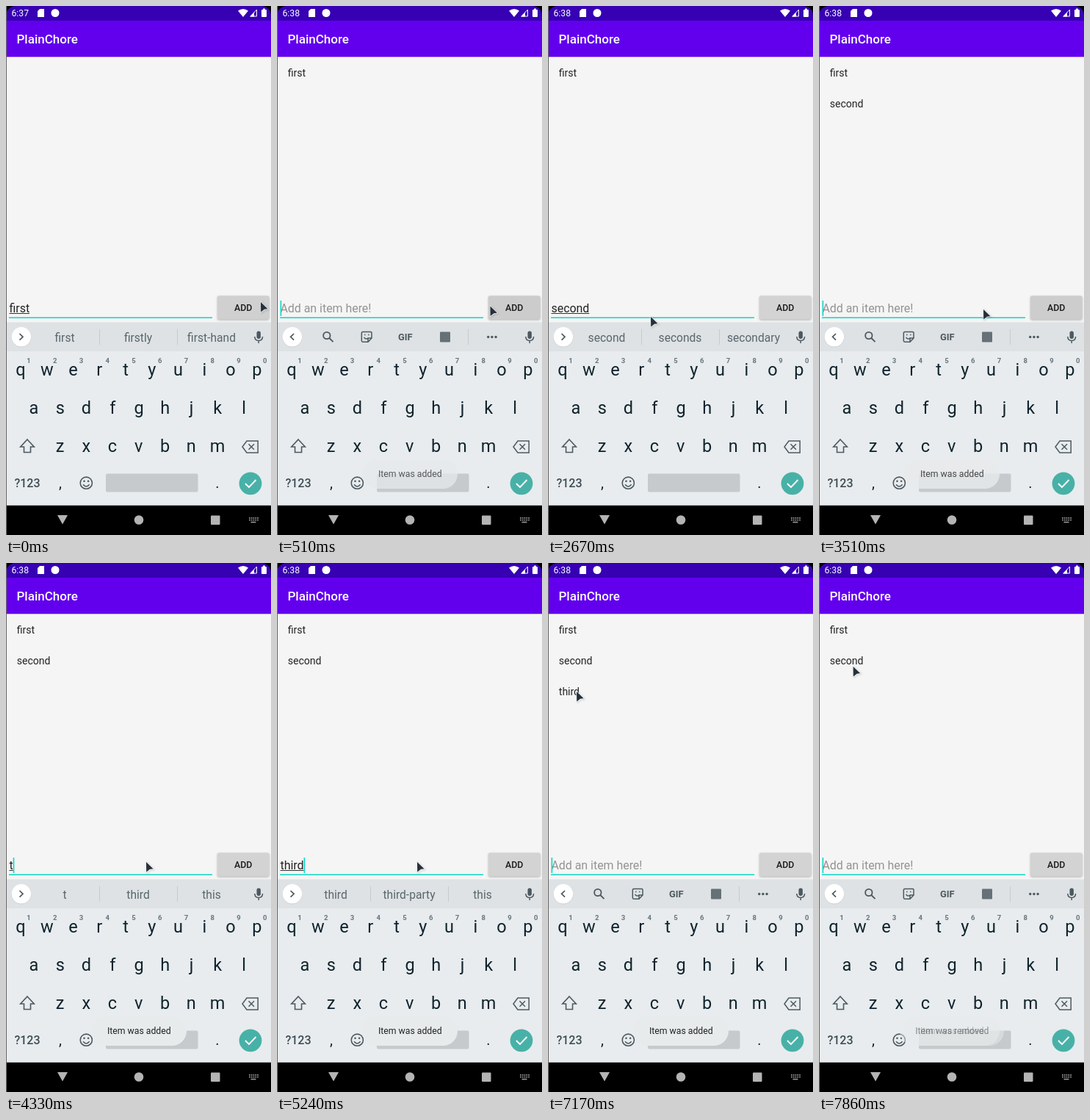
An HTML page with a canvas that plays this animation: 361x720 px, repeating every 8 s.

```html
<!DOCTYPE html>
<html lang="en">
<head>
<meta charset="utf-8">
<title>To-do list demo</title>
<style>
html, body { margin: 0; width: 100%; height: 100%; overflow: hidden; background: #f5f5f5; }
canvas { display: block; width: 361px; height: 720px; }
</style>
</head>
<body>
<canvas id="stage" width="361" height="720"></canvas>
<script>
const ctx = document.getElementById('stage').getContext('2d');
const LOOP = 8000, FRAME = 130, BLINK = 500;
const TOAST_DELAY = 100, TOAST_LIFE = 1900, TOAST_FADE = 210;
const INK = '#10232d', ICON = '#4c5960', KEYS = '#e8ecee', STRIP = '#dee2e4', TEAL = '#0dd6c4';

// Each to-do is typed between start and done, then added (and maybe removed).
const todos = [
  { word: 'first', hints: ['firstly', 'first-hand'], start: -1200, done: -600, added: 260 },
  { word: 'second', hints: ['seconds', 'secondary'], start: 1730, done: 2140, added: 3240 },
  { word: 'third', hints: ['third-party', 'this'], start: 4330, done: 4810, added: 5760, removed: 7590 }
];

const pointerStart = { x: 347, y: 403 };
const pointerMoves = [
  { from: 300, to: 910, x: 140, y: 423 },
  { from: 2700, to: 3090, x: 345, y: 404 },
  { from: 3260, to: 3510, x: 224, y: 413 },
  { from: 3510, to: 3760, x: 191, y: 407 },
  { from: 5240, to: 5630, x: 345, y: 405 },
  { from: 5800, to: 6170, x: 16, y: 160 },
  { from: 6240, to: 6600, x: 39, y: 175 },
  { from: 7600, to: 7860, x: 47, y: 139 }
];

const clamp = v => Math.max(0, Math.min(1, v));
const easeOut = p => 1 - (1 - p) ** 2;

function inputState(t) {
  const todo = todos.findLast(item => item.start <= t);
  if (t >= todo.added) return { typed: '', words: [], lastEdit: todo.added };
  const { word, hints, start, done } = todo;
  const progress = clamp((t - start) / (done - start));
  const typed = word.slice(0, 1 + Math.floor((word.length - 1) * progress));
  const words = typed === word ? [word, ...hints] : [typed, word, hints[1]];
  return { typed, words, lastEdit: Math.min(t, done) };
}

function pointerAt(t) {
  let { x, y } = pointerStart;
  for (const move of pointerMoves) {
    const p = easeOut(clamp((t - move.from) / (move.to - move.from)));
    x += (move.x - x) * p;
    y += (move.y - y) * p;
  }
  return { x, y };
}

function rect(x, y, w, h, fill, r = 0) {
  ctx.fillStyle = fill;
  ctx.beginPath();
  ctx.roundRect(x, y, w, h, r);
  ctx.fill();
}
function disc(x, y, r, fill) {
  ctx.fillStyle = fill;
  ctx.beginPath();
  ctx.arc(x, y, r, 0, Math.PI * 2);
  ctx.fill();
}
function ring(x, y, r, width) {
  ctx.strokeStyle = ICON;
  ctx.lineWidth = width;
  ctx.beginPath();
  ctx.arc(x, y, r, 0, Math.PI * 2);
  ctx.stroke();
}
function fillPath(d, fill) {
  ctx.fillStyle = fill;
  ctx.fill(new Path2D(d));
}
function strokePath(d, color = ICON, width = 1.6) {
  ctx.strokeStyle = color;
  ctx.lineWidth = width;
  ctx.stroke(new Path2D(d));
}
function label(str, x, y, size, fill, align = 'left', weight = 400) {
  ctx.font = `${weight} ${size}px Roboto, sans-serif`;
  ctx.textAlign = align;
  ctx.fillStyle = fill;
  ctx.fillText(str, x, y);
  return ctx.measureText(str).width;
}

function drawBars(t) {
  rect(0, 0, 361, 720, '#f5f5f5');
  rect(0, 0, 361, 20, '#000');
  rect(0, 0, 361, 20, '#3700b3', [13, 13, 0, 0]);
  rect(0, 20, 361, 49, '#6200ee');
  rect(0, 69, 361, 1, '#cbb5ea');
  label(t < 390 ? '6:37' : '6:38', 7.5, 14, 12.2, '#fff');
  fillPath('M46 4H52V15H43V7Z', '#fff');
  disc(67, 9.5, 5.5, '#fff');
  fillPath('M316 6.5Q323 1.5 330 6.5L323 15Z', '#fff');
  strokePath('M333 14L341.5 5V14Z', '#fff', 1);
  fillPath('M332 14.5L338 8.5V14.5Z', '#fff');
  rect(348, 5, 7, 10, '#fff', 1);
  rect(350, 3.5, 3, 2, '#fff');
  label('PlainChore', 14.5, 51, 17, '#fff', 'left', 500);

  rect(0, 679.5, 361, 41, '#000');
  fillPath('M70 693H84L77 705.5Z', '#b4b4b4');
  disc(181, 699.5, 6.3, '#b4b4b4');
  rect(279, 693.5, 12.5, 12.5, '#b4b4b4', 1);
  for (let row = 0; row < 2; row++)
    for (let col = 0; col < 5; col++) rect(331 + col * 2.8, 696 + row * 2.8, 1.7, 1.7, '#999');
  rect(333.5, 701.8, 7, 1.6, '#999');
}

function drawList(t) {
  todos.filter(todo => todo.added <= t && !(todo.removed <= t))
    .forEach((todo, i) => label(todo.word, 14.8, 95.8 + i * 42, 14, '#222'));
}

function drawInput(t, { typed, lastEdit }) {
  let caretX = 5;
  if (typed) {
    const width = label(typed, 4.5, 417, 15.9, '#222');
    rect(4.5, 418, width, 1, '#333');
    caretX += width;
  } else {
    label('Add an item here!', 4.5, 417, 15.9, '#939393');
  }
  rect(4, 423.4, 277, 1.7, TEAL);
  if (Math.floor((t - lastEdit) / BLINK) % 2 === 0) rect(caretX - 0.5, 401, 1.6, 21, TEAL);
}

function drawButton(t) {
  const press = todos.findLast(todo => todo.added - FRAME <= t);
  const gray = 211 - (press ? 16 * clamp(1 - (t - press.added) / 450) : 3);
  ctx.save();
  ctx.shadowColor = 'rgba(0,0,0,.28)';
  ctx.shadowBlur = 3;
  ctx.shadowOffsetY = 1;
  rect(288, 394.5, 70.5, 32, `rgb(${gray} ${gray} ${gray})`, 2);
  ctx.restore();
  label('ADD', 323.2, 415, 12.4, '#1c1c1c', 'center', 500);
}

function drawStrip(words) {
  const divider = x => rect(x, 440, 1, 21, '#c5cbce');
  rect(0, 430.5, 361, 40, STRIP);
  disc(20.8, 451, 13.5, 'rgba(0,0,0,.08)');
  disc(20.8, 450.3, 13.2, '#fff');
  if (words.length) {
    strokePath('M18.5 446L23 450.3L18.5 454.6', ICON, 1.7);
    words.forEach((word, i) => label(word, 80 + i * 100, 456.5, 15.6, '#59666c', 'center'));
    divider(127);
    divider(233);
  } else {
    strokePath('M23 446L18.5 450.3L23 454.6', ICON, 1.7);
    ring(67.8, 448.5, 4.7, 1.8);
    strokePath('M71.3 452L76.5 457.2', ICON, 1.8);
    strokePath('M117 443.5H127.5Q129 443.5 129 445V452L124 457.2H117Q115.3 457.2 115.3 455.5V445Q115.3 443.5 117 443.5M129 452H124V457M118.5 451Q121 454.5 124 452M119 447.5H120.5M124 447.5H125.5', ICON, 1.5);
    label('GIF', 174.8, 454.8, 12.9, ICON, 'center', 700);
    rect(222, 443.5, 14, 14, '#657177', 1);
    divider(260);
    for (let i = 0; i < 3; i++) disc(287.7 + i * 5.2, 450.5, 1.7, ICON);
  }
  rect(341.5, 442.5, 5.4, 10.5, ICON, 2.7);
  strokePath('M338.8 450Q339 455.5 344.2 455.5Q349.4 455.5 349.6 450M344.2 455.5V459', ICON, 1.5);
}

function drawKeyboard() {
  const pitch = 35.75;
  rect(0, 470, 361, 209.5, KEYS);
  const row = (keys, x, y, size = 23.5, fill = INK, weight = 400) => [...keys].forEach((key, i) =>
    label(key, x + i * pitch, y, size, fill, 'center', weight));
  row('qwertyuiop', 20, 503);
  row('asdfghjkl', 38, 555);
  row('zxcvbnm', 73.5, 606.5);
  row('1234567890', 31, 486, 9.5, '#68757b', 700);

  strokePath('M29 590L38.3 600H33.5V607.5H24.5V600H19.7Z');
  strokePath('M328 592H343.2V608H328L322 600ZM330.5 596.3L338 603.8M338 596.3L330.5 603.8', ICON, 1.5);
  label('?123', 29, 655, 16, '#3e4d55', 'center', 500);
  label(',', 74, 656, 20, INK, 'center');
  label('.', 288, 656, 20, INK, 'center');
  ring(109.3, 649.2, 8.1, 1.6);
  strokePath('M105 651.3Q109.3 656.6 113.6 651.3', ICON, 1.5);
  disc(106.5, 646.8, 1.3, ICON);
  disc(112.1, 646.8, 1.3, ICON);
  rect(136, 636.5, 125.5, 25, '#c6cacd', 2);
  disc(333, 649.8, 15.4, '#48b1a7');
  strokePath('M326 650L331 655L340.5 645', '#fff', 1.9);
}

function drawToast(t, start, message, half) {
  ctx.globalAlpha = clamp((t - start) / TOAST_FADE) * clamp(1 - (t - start - TOAST_LIFE) / TOAST_FADE);
  rect(181 - half, 617, half * 2, 40, '#e8ebec', 20);
  label(message, 181.3, 641, 12.25, '#222', 'center');
  ctx.globalAlpha = 1;
}

function drawToasts(t) {
  for (const { added, removed } of todos) {
    const start = added + TOAST_DELAY;
    drawToast(t, start, 'Item was added', 65);
    if (removed) drawToast(t, start + TOAST_LIFE, 'Item was removed', 71);
  }
}

function drawPointer(t) {
  const { x, y } = pointerAt(t);
  const arrow = 'M0 0L9.5 9.2L5 9.8L0.2 13.6Z';
  ctx.save();
  ctx.translate(x, y);
  ctx.shadowColor = 'rgba(0,0,0,.2)';
  ctx.shadowBlur = 3;
  ctx.shadowOffsetX = ctx.shadowOffsetY = 1;
  strokePath(arrow, '#eef1f2', 1.4);
  ctx.shadowColor = 'transparent';
  fillPath(arrow, '#25303a');
  ctx.restore();
}

function render(now) {
  const t = now % LOOP;
  const input = inputState(t);
  drawBars(t);
  drawList(t);
  drawInput(t, input);
  drawButton(t);
  drawStrip(input.words);
  drawKeyboard();
  drawToasts(t);
  rect(0, 0, 1, 720, '#666');
  drawPointer(Math.floor(t / FRAME) * FRAME);
}

const began = performance.now();
function loop() {
  render(performance.now() - began);
  requestAnimationFrame(loop);
}
loop();
</script>
</body>
</html>
```
